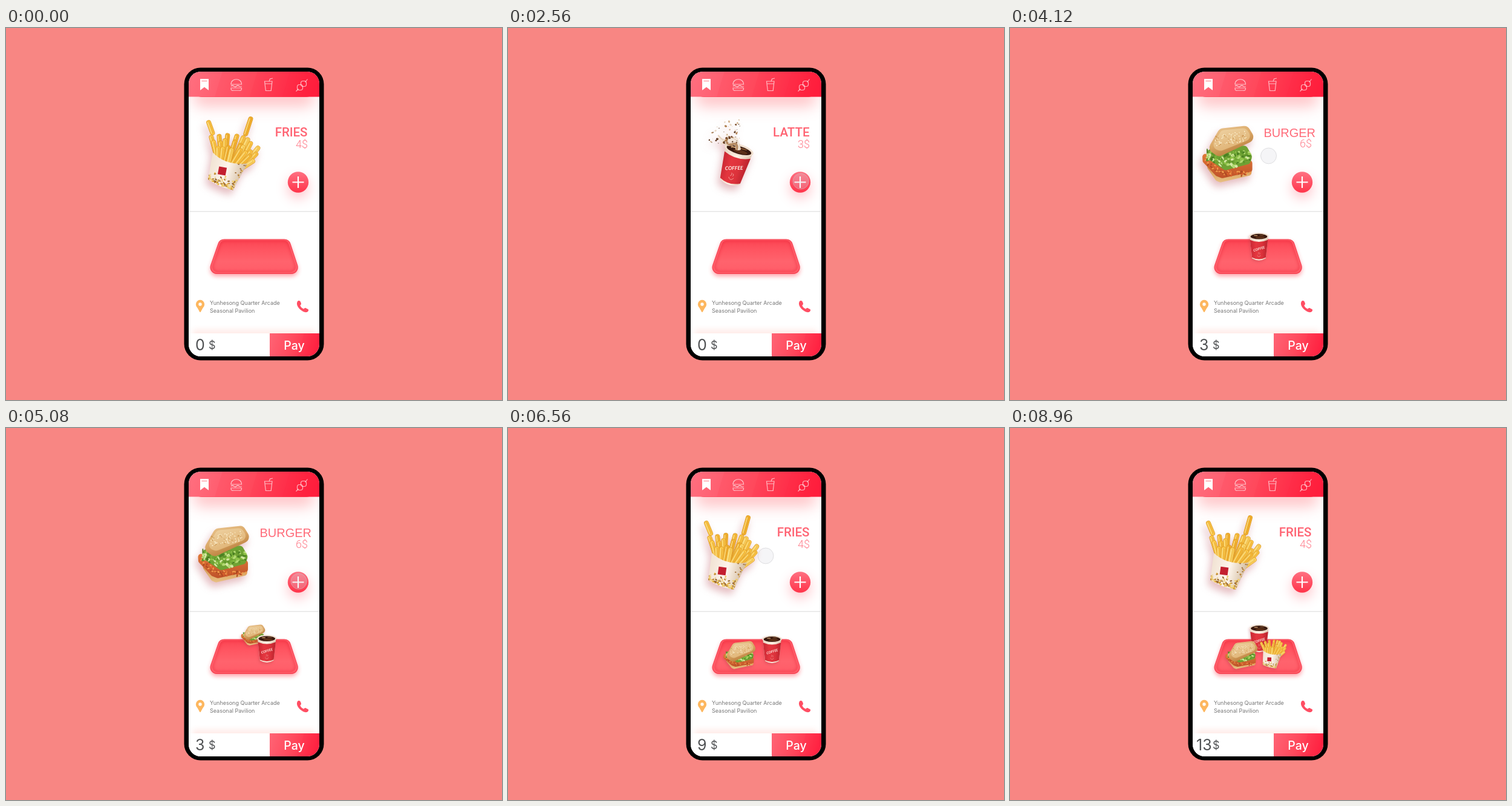
An HTML page with a canvas that plays this animation: 820x614 px, repeating every 9000 ms.

```html
<!DOCTYPE html>
<html lang="en">
<head>
<meta charset="utf-8">
<title>Food order</title>
<style>
html, body { margin: 0; width: 100%; height: 100%; overflow: hidden; background: #f88683; }
canvas { display: block; }
</style>
</head>
<body>
<canvas id="stage" width="820" height="614"></canvas>
<script>
const W = 820, H = 614, LOOP = 9000, CYCLE = 2400;
const g = document.getElementById('stage').getContext('2d');
const layer = document.createElement('canvas');
layer.width = W; layer.height = H;
const L = layer.getContext('2d');

const clamp = v => Math.max(0, Math.min(1, v));
const mix = (a, b, u) => a + (b - a) * u;
const sine = u => (1 - Math.cos(Math.PI * clamp(u))) / 2;
const easeOut = u => 1 - (1 - clamp(u)) ** 3;

let seed = 1;
const rnd = () => (seed = seed * 16807 % 2147483647) / 2147483647;
const pick = list => list[Math.floor(rnd() * list.length)];

function gradient(c, x0, y0, x1, y1, ...colors) {
  const f = c.createLinearGradient(x0, y0, x1, y1);
  colors.forEach((col, i) => f.addColorStop(i / (colors.length - 1), col));
  return f;
}
function dot(c, x, y, rx, ry, fill, rot = 0) {
  c.beginPath();
  c.ellipse(x, y, rx, ry, rot, 0, 7);
  c.fillStyle = fill;
  c.fill();
}
function box(c, x, y, w, h, r, fill) {
  c.beginPath();
  c.roundRect(x, y, w, h, r);
  c.fillStyle = fill;
  c.fill();
}
function line(c, pts, width, color) {
  c.beginPath();
  pts.forEach(p => c.lineTo(...p));
  c.lineWidth = width;
  c.strokeStyle = color;
  c.stroke();
}
// Closed shape with corners rounded to radius r
function poly(c, pts, r, fill) {
  const n = pts.length, [a, b] = pts;
  c.beginPath();
  c.moveTo((a[0] + b[0]) / 2, (a[1] + b[1]) / 2);
  for (let i = 1; i <= n; i++) c.arcTo(...pts[i % n], ...pts[(i + 1) % n], r);
  c.closePath();
  c.fillStyle = fill;
  c.fill();
}
function label(s, x, y, font, fill, align = 'left') {
  g.font = font;
  g.textAlign = align;
  g.fillStyle = fill;
  g.fillText(s, x, y);
}

// ---- Food; e is 0 when packed and 1 when fully burst open ----
function stick(x0, y0, x1, y1, color) {
  const pts = [[x0, y0], [x1, y1]];
  line(L, pts, 8, '#dc9a2a');
  line(L, pts, 6.6, color);
  L.setLineDash([1, 2.2]);
  line(L, pts, 5, 'rgba(205,125,15,.2)');
  L.setLineDash([]);
  line(L, [[x0 - 1.5, y0], [x1 - 1.5, y1]], 1.8, 'rgba(255,240,165,.6)');
}
function fries(e) {
  const golds = ['#fcc94a', '#f4b533', '#fdd765', '#f8bf3e'];
  seed = 77;
  if (e) {
    const d = 6 * (1 - e);
    stick(328, 157 + d, 335, 174 + d, golds[0]);
    stick(397, 148 + d, 390, 173 + d, golds[1]);
  }
  poly(L, [[340, 200], [396, 214], [380, 246], [338, 236]], 4, '#e0a02e');
  for (let row = 0; row < 3; row++) {
    for (let i = 0; i < 8; i++) {
      const u = i / 7, x = mix(346, 386, u), y = mix(220, 230, u);
      const a = (mix(-100, -60 + row * 11, u) + (rnd() - .5) * 16) * Math.PI / 180;
      const r = 40 - row * 11 + 6 * Math.sin(u * 3) + rnd() * 5;
      stick(x, y, x + Math.cos(a) * r, y + Math.sin(a) * r, pick(golds));
    }
  }
  L.beginPath();
  L.moveTo(337, 206);
  L.quadraticCurveTo(358, 227, 395, 222);
  L.lineTo(373, 267);
  L.quadraticCurveTo(350, 263, 331, 251);
  L.closePath();
  L.fillStyle = gradient(L, 331, 230, 392, 245, '#f1e2d2', '#fdf5ec', '#cfb698');
  L.fill();
  L.save();
  L.clip();
  for (let i = 0; i < 80; i++) {
    const u = rnd(), edge = rnd() ** 2;
    dot(L, mix(331, 378, u), mix(253, 267, u) - edge * 17, 2, 1.2,
      pick(['#e5ae35', '#bd8a3c', '#f0cc68', '#96652f', '#eed9a4']), rnd() * 3);
  }
  for (let i = 0; i < 20; i++)
    dot(L, 376 + rnd() * 18, 222 + rnd() * 26, 1.4, 1, pick(['#d9a646', '#a5743f']));
  L.restore();
  L.save();
  L.translate(354, 236);
  L.rotate(.14);
  L.fillStyle = '#c3202f';
  L.fillRect(-6.5, -6.5, 13, 13);
  L.restore();
}

function cup(e) {
  L.save();
  L.translate(382, 201);
  L.rotate(.28);
  L.beginPath();
  L.moveTo(-23, 1);
  L.lineTo(-17, 55);
  L.quadraticCurveTo(0, 65, 17, 55);
  L.lineTo(23, 1);
  L.fillStyle = gradient(L, -23, 0, 23, 0, '#e6d2c0', '#fff4e6', '#dcc2ac');
  L.fill();
  L.beginPath();
  L.moveTo(-22.3, 9);
  L.quadraticCurveTo(0, 19, 22.3, 9);
  L.lineTo(17.2, 53);
  L.quadraticCurveTo(0, 62, -17.2, 53);
  L.fillStyle = gradient(L, -22, 0, 22, 0, '#c92733', '#e4363f', '#dc323b', '#b9222d');
  L.fill();
  L.font = 'italic 700 8.5px Lato, sans-serif';
  L.textAlign = 'center';
  L.fillStyle = '#fff3ea';
  L.save();
  L.rotate(-.3);
  L.fillText('COFFEE', -9, 33);
  L.restore();
  L.beginPath();
  L.arc(0, 47, 4, .2, 2.9);
  L.moveTo(-2, 45);
  L.quadraticCurveTo(1, 43, -1, 40);
  L.moveTo(2, 45);
  L.quadraticCurveTo(4, 43, 2, 41);
  L.lineWidth = .8;
  L.strokeStyle = 'rgba(255,225,210,.7)';
  L.stroke();
  dot(L, 0, 0, 24.5, 9, '#f1e1d0');
  dot(L, 0, .5, 21, 6.5, '#38190f');
  dot(L, 3, 2.5, 12, 3, '#5b2f18');
  dot(L, -8, -2, 5, 1.3, '#c99a6a');
  dot(L, 7, -3, 6, 1, '#8b5a33');
  L.restore();
  if (!e) return;

  seed = 421;
  L.save();
  L.translate(380, 198);
  L.scale(e, e);
  for (let i = 0; i < 8; i++) {
    const x = -12 - rnd() * 25, y = -6 - rnd() * 18;
    L.beginPath();
    L.moveTo(-4 + rnd() * 8, 2);
    L.quadraticCurveTo(-2 + rnd() * 4, y, x * .5, y * .7);
    L.quadraticCurveTo(x * .7, y * .4, x, y);
    L.lineWidth = 1 + rnd() * 3;
    L.strokeStyle = pick(['#f1e6da', '#b58a62', '#e6d3be', '#7d5235']);
    L.stroke();
  }
  for (let i = 0; i < 60; i++) {
    const a = mix(-168, -78, rnd()) * Math.PI / 180, r = 8 + rnd() * 42, s = .4 + rnd() * 1.3;
    dot(L, Math.cos(a) * r, Math.sin(a) * r, s * 1.3, s,
      pick(['#7a4c2b', '#b08050', '#eadbc9', '#d2b08a', '#5a3620']), rnd() * 3);
  }
  L.restore();
}

function burger(e) {
  const shut = 1 - e;
  seed = 909;
  L.translate(0, 212 * .13 * shut);
  L.scale(1, 1 - .13 * shut);
  poly(L, [[319, 222], [360, 232], [400, 232], [398, 243], [347, 255], [340, 252]], 5,
    gradient(L, 0, 225, 0, 255, '#cf9049', '#e9c083'));
  poly(L, [[317, 205], [352, 220], [400, 218], [400, 237], [350, 248], [340, 244], [318, 221]], 5,
    gradient(L, 0, 208, 0, 246, '#df7a38', '#c0532a'));
  for (let i = 0; i < 60; i++) {
    const u = rnd();
    dot(L, mix(321, 397, u), 214 + Math.min(u * 55, 22) + rnd() * 8, 2, 1.2,
      pick(['#f09a4c', '#b04a24', '#d8602c']), rnd() * 3);
  }
  poly(L, [[322, 202], [350, 196], [390, 194], [400, 212], [396, 224], [355, 235], [328, 217]], 7, '#6fa234');
  for (let i = 0; i < 130; i++) {
    const u = rnd();
    dot(L, mix(325, 396, u), 203 + rnd() * mix(13, 27, Math.sin(u * 3)), 1.5 + rnd() * 2.6, 1 + rnd() * 1.4,
      pick(['#8fc248', '#5f962b', '#b3d973', '#78b03a', '#4b8023', '#d5e8a5']), rnd() * 3);
  }
  L.save();
  L.translate(366, 188 + 14 * shut);
  L.scale(1 + .08 * shut, 1 + .28 * shut);
  L.translate(-366, -188);
  poly(L, [[326, 200], [346, 166], [392, 161], [406, 184], [344, 213]], 10,
    gradient(L, 350, 165, 366, 207, '#e6bf87', '#dba968', '#bd8140'));
  poly(L, [[331, 198], [349, 169], [389, 165], [401, 182], [348, 203]], 9,
    gradient(L, 360, 167, 372, 200, '#eccd9b', '#dfb273'));
  for (let i = 0; i < 80; i++) {
    const u = rnd(), v = rnd();
    dot(L, mix(340, 394, u) - v * 6, mix(178, 169, u) + v * 18, 1.2, .8,
      pick(['#fbecca', '#f4dfb4', '#cd9a57']), rnd() * 3);
  }
  L.restore();
}

function food(draw, e, place, alpha, blur) {
  L.clearRect(0, 0, W, H);
  L.save();
  place();
  L.lineCap = 'round';
  draw(e);
  L.restore();
  g.save();
  g.globalAlpha = alpha;
  g.shadowColor = 'rgba(180,60,70,.34)';
  g.shadowBlur = blur;
  g.shadowOffsetX = -blur * .3;
  g.shadowOffsetY = blur * .6;
  g.drawImage(layer, 0, 0);
  g.restore();
}

// ---- Screen parts ----
function header() {
  g.save();
  g.shadowColor = 'rgba(255,75,85,.34)';
  g.shadowBlur = 24;
  g.shadowOffsetY = 15;
  box(g, 310, 84, 200, 30, 14, '#ff4a5c');
  g.restore();
  g.fillStyle = gradient(g, 302, 71, 500, 131, '#ff7080', '#ff4e61', '#ff2140');
  g.fillRect(302, 71, 216, 42.5);
  for (const x of [358, 416, 470])
    poly(g, [[x, 71], [530, 71], [530, 114], [x - 13, 114]], 0, 'rgba(255,15,50,.07)');
  poly(g, [[321, 84], [335, 84], [335, 103], [328, 97.5], [321, 103]], .5, '#fff');
  line(g, [[323.5, 87.5], [332.5, 87.5]], 1, '#ff7b88');

  g.lineWidth = 1.2;
  g.strokeStyle = 'rgba(255,255,255,.65)';
  const icon = new Path2D(
    'M372 93c0-11 17.500-11 17.500 0z M372 96q2-2 4.500 0t4.500 0 4.500 0 4 0' +
    'M372 99h17.500c0 5-2 4-4 4h-9.500c-2 0-4 1-4-4z' +
    'M427.500 88h12.500l-1.800 15.500h-8.800z M428 92h11.500 M435 88l1.500-4 4.500-1' +
    'M479.500 104.500l4-4 M494.500 89.500l4-5');
  g.stroke(icon);
  for (const [x, y] of [[486, 98], [492, 92]]) {
    g.beginPath();
    g.roundRect(x - 4.5, y - 4.5, 9, 9, 3.5);
    g.stroke();
  }
}

function tray() {
  g.save();
  g.shadowColor = 'rgba(255,60,75,.45)';
  g.shadowBlur = 7;
  g.shadowOffsetY = 4;
  poly(g, [[353, 348.5], [468, 348.5], [487, 406], [333, 406]], 11, '#f64353');
  g.restore();
  poly(g, [[354, 349.5], [467, 349.5], [485.5, 404.5], [334.5, 404.5]], 10, '#ff5d69');
  poly(g, [[355.5, 350.5], [465.5, 350.5], [482.5, 403], [337.5, 403]], 9,
    gradient(g, 0, 350, 0, 403, '#fb4553', '#ff5662', '#ff636d', '#ff5c68'));
  g.save();
  g.clip();
  g.filter = 'blur(2px)';
  g.lineWidth = 4;
  g.strokeStyle = 'rgba(235,30,52,.38)';
  g.stroke();
  g.restore();
}

function footer(total) {
  dot(g, 321, 456, 7.2, 7.2, '#fdb75f');
  poly(g, [[314.3, 458], [327.7, 458], [321, 470]], 1, '#fdb75f');
  dot(g, 321, 456, 2.7, 2.7, '#fff');
  const font = '9px Inter, sans-serif';
  label('Yunhesong Quarter Arcade', 337, 457, font, '#777');
  label('Seasonal Pavilion', 337, 469.5, font, '#777');
  g.fillStyle = '#ff4e63';
  g.fill(new Path2D('M482 451c2-2 4-1 5 1l1 3c.5 1.500-2 2-1.500 3.500 1 2 3 4 5 5 1.500.5 2-2 3.500-1.500' +
    'l4 2c2 1 1 3 0 4-2 2-6 1.500-10-1.500-6-4-10-10-7-15.500z'));

  g.save();
  g.shadowColor = 'rgba(255,110,90,.14)';
  g.shadowBlur = 10;
  g.shadowOffsetY = -6;
  box(g, 309, 504, 202, 20, 0, '#fff');
  g.restore();
  g.fillStyle = '#fff';
  g.fillRect(302, 504, 134, 40);
  g.fillStyle = gradient(g, 436, 504, 512, 528, '#ff6475', '#ff4a5d', '#ff2543');
  g.fillRect(436, 504, 82, 40);
  poly(g, [[493, 504], [530, 504], [530, 544], [481, 544]], 0, 'rgba(255,15,50,.08)');
  label('Pay', 476.5, 530.5, '500 19.5px Inter, sans-serif', '#fff', 'center');
  label(total, 320.8, 532, '25px Inter, sans-serif', '#505254', 'center');
  label('$', 335, 529.5, '18px Inter, sans-serif', '#505254');
}

function addButton(alpha) {
  g.save();
  g.globalAlpha = alpha;
  g.shadowColor = 'rgba(255,70,90,.32)';
  g.shadowBlur = 20;
  g.shadowOffsetY = 9;
  dot(g, 483, 254.5, 17.2, 17.2, gradient(g, 0, 237, 0, 272, '#ff7182', '#ff3349'));
  g.shadowColor = 'transparent';
  line(g, [[473.5, 254.5], [492.5, 254.5]], 2.2, '#fff');
  line(g, [[483, 245], [483, 264]], 2.2, '#fff');
  g.restore();
}

// ---- Motion ----
const FRIES = { name: 'FRIES', price: '4$', draw: fries };
const LATTE = { name: 'LATTE', price: '3$', draw: cup };
const BURGER = { name: 'BURGER', price: '6$', draw: burger, thin: true };
const menu = [FRIES, LATTE, BURGER, FRIES];
const since = (t, start, k) => t - start - CYCLE * k;

function carousel(t) {
  let pos = 0, shown = 0;
  for (let k = 0; k < 3; k++) pos += sine(since(t, 812, k) / 947);
  const settle = clamp(1 - t / 450) ** 2;
  menu.forEach((item, i) => {
    const d = i - pos;
    if (Math.abs(d) >= 1.5) return;
    const off = 144 * d + (d > 0 ? 80 * d ** 4 : 0);
    const a = clamp(1 - Math.abs(off) / 69);
    shown = Math.max(shown, a);
    food(item.draw, .85 + .15 * a, () => {
      L.translate(off, 0);
      if (i) return;
      L.translate(354 + 3.5 * settle, 237);
      L.rotate(.045 * settle);
      L.translate(-354, -237);
    }, 1, 13);
    if (!a) return;
    const dy = -20 * (1 - a);
    g.globalAlpha = a;
    if (item.thin) label(item.name, 505, 180 + dy, '20px "Liberation Sans", Arial, sans-serif', '#ff6b79', 'right');
    else label(item.name, 498.5, 178.5 + dy, '500 20.5px Roboto, sans-serif', '#ff6473', 'right');
    label(item.price, 499, 197.5 + dy, '300 18px Roboto, sans-serif', '#ff7f8c', 'right');
    g.globalAlpha = 1;
  });
  addButton(shown);
}

function order(t) {
  const enter = k => sine(since(t, 2560, k) / 400);
  const shift = k => easeOut(since(t, 2560, k) / 300);
  const u = shift(1), v = shift(2);
  const items = [
    { draw: cup, c: [374.8, 226], s: .66, rot: -.28, x: mix(mix(411.5, 436.5, u), 412, v), y: mix(mix(361, 365.5, u), 347.5, v) },
    { draw: burger, c: [360, 212], s: .61, rot: 0, x: 382, y: 375 },
    { draw: fries, c: [369, 220], s: .51, rot: -.1, x: 435.5, y: 373 }
  ];
  items.forEach((it, k) => {
    it.in = enter(k);
    it.x = mix(415, it.x, it.in);
    it.y = mix(333, it.y, it.in);
    it.s *= mix(.68, 1, it.in);
  });
  items.filter(it => it.in > 0).sort((a, b) => a.y - b.y).forEach(it =>
    food(it.draw, 0, () => {
      L.translate(it.x, it.y);
      L.scale(it.s, it.s);
      L.rotate(it.rot);
      L.translate(-it.c[0], -it.c[1]);
    }, clamp(it.in * 5), 4));
}

function finger(t) {
  const k = Math.max(0, Math.min(2, Math.floor((t - 700) / CYCLE)));
  const s = t - CYCLE * k;
  const alpha = clamp((s - 700) / 120) * clamp((2950 - s) / 200);
  if (!alpha) return;
  const drag = clamp((s - 812) / 948), go = sine((s - 1880) / 520);
  const x = mix(mix(463, 426, drag), 484, go), y = mix(k ? 211 : 199, 253, go);
  g.globalAlpha = alpha;
  dot(g, x, y, 13, 13, 'rgba(215,215,222,.25)');
  g.lineWidth = 1;
  g.strokeStyle = 'rgba(195,195,200,.5)';
  g.stroke();
  g.globalAlpha = 1;
}

function frame() {
  const t = performance.now() % LOOP;
  g.fillStyle = '#f88683';
  g.fillRect(0, 0, W, H);
  box(g, 294.5, 65.5, 231, 483, 27, '#000');
  box(g, 302, 72, 216, 470, 20, '#fff');
  g.save();
  g.clip();
  header();
  g.fillStyle = '#e6e6e6';
  g.fillRect(302, 302, 216, 1.5);
  carousel(t);
  tray();
  order(t);
  footer(t < 2900 ? 0 : t < 5300 ? 3 : t < 7700 ? 9 : 13);
  finger(t);
  g.restore();
  requestAnimationFrame(frame);
}
frame();
</script>
</body>
</html>
```
